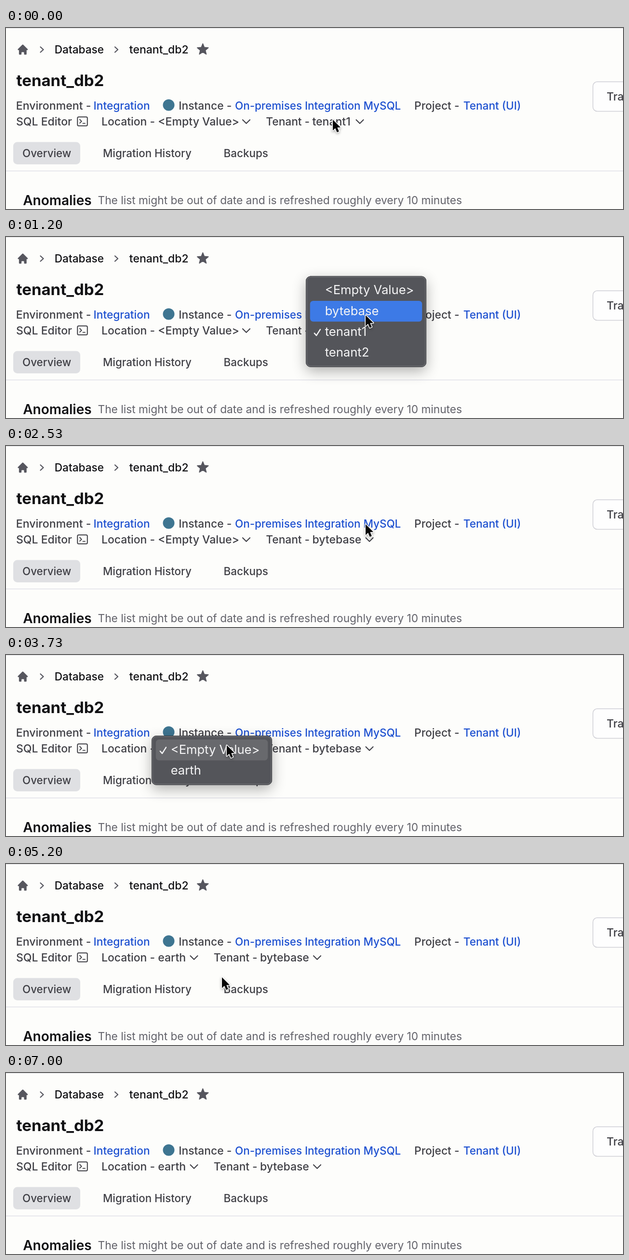
Animation of 1280 by 377 pixels, one loop 7.07 s. Source, as an HTML page with a canvas:

```html
<!DOCTYPE html>
<html lang="en">
<head>
<meta charset="utf-8">
<title>Database labels</title>
<style>
  html, body { margin: 0; width: 100%; height: 100%; overflow: hidden; background: #fdfdfb; }
  canvas { display: block; width: 100vw; height: 100vh; }
</style>
</head>
<body>
<canvas id="stage" width="1280" height="377"></canvas>
<script>
const ctx = document.getElementById('stage').getContext('2d');
const LOOP = 7070;
const FADE = 140;
const ROW = 43.3;
const INK = '#3f3f45', BLACK = '#111114', LINK = '#1d50d0', ICON = '#56565e';

// Pointer stops: time, x, y of the tip.
const stops = [
  [0, 678, 191], [870, 678, 191], [1150, 746, 163], [2650, 746, 163],
  [3350, 458, 188], [4250, 458, 188], [4700, 448, 236], [5200, 448, 236],
  [5700, 1241, 198], [6050, 1241, 198], [6450, 1265, 390], [LOOP, 1265, 390]
];

const menus = [
  { x: 622, y: 81.5, rows: ['<Empty Value>', 'bytebase', 'tenant1', 'tenant2'],
    checked: 2, open: 300, moved: 870, close: 1750 },
  { x: 302, y: 168, rows: ['<Empty Value>', 'earth'],
    checked: 0, open: 3600, moved: 4250, close: 5050 }
];

const ease = p => p * p * (3 - 2 * p);

function pointerAt(t) {
  const i = stops.findIndex((s, n) => n > 0 && t <= s[0]);
  const [t0, x0, y0] = stops[i - 1], [t1, x1, y1] = stops[i];
  const p = ease((t - t0) / (t1 - t0));
  return { x: x0 + (x1 - x0) * p, y: y0 + (y1 - y0) * p };
}

function text(str, x, y, size, color = INK, weight = 500) {
  ctx.font = `${weight} ${size}px Inter, sans-serif`;
  ctx.fillStyle = color;
  ctx.fillText(str, x, y);
}

function box(x, y, w, h, r) {
  ctx.beginPath();
  ctx.roundRect(x, y, w, h, r);
}

function fillBox(x, y, w, h, r, color) {
  box(x, y, w, h, r);
  ctx.fillStyle = color;
  ctx.fill();
}

function line(points, color, width) {
  ctx.beginPath();
  points.forEach(([x, y]) => ctx.lineTo(x, y));
  ctx.strokeStyle = color;
  ctx.lineWidth = width;
  ctx.lineCap = ctx.lineJoin = 'round';
  ctx.stroke();
}

const chevronRight = (x, y) => line([[x - 3, y - 5.5], [x + 3, y], [x - 3, y + 5.5]], ICON, 2.3);
const chevronDown = (x, y) => line([[x - 7.5, y - 3.8], [x, y + 3.8], [x + 7.5, y - 3.8]], INK, 2.1);

function home() {
  const shape = new Path2D('M10.7 2.3a1 1 0 0 0-1.4 0l-7 7a1 1 0 0 0 1.4 1.4L4 10.4V17a1 1 0 0 0 1 1h2a1 1 0 0 0 1-1v-2a1 1 0 0 1 1-1h2a1 1 0 0 1 1 1v2a1 1 0 0 0 1 1h2a1 1 0 0 0 1-1v-6.6l.3.3a1 1 0 0 0 1.4-1.4z');
  ctx.save();
  ctx.translate(21.6, 31.8);
  ctx.scale(1.32, 1.32);
  ctx.fillStyle = ICON;
  ctx.fill(shape);
  ctx.restore();
}

function star(cx, cy) {
  ctx.beginPath();
  for (let i = 0; i < 10; i++) {
    const r = i % 2 ? 5.3 : 12, a = i * Math.PI / 5 - Math.PI / 2;
    ctx.lineTo(cx + r * Math.cos(a), cy + r * Math.sin(a));
  }
  ctx.closePath();
  ctx.fillStyle = ctx.strokeStyle = ICON;
  ctx.lineWidth = 1.8;
  ctx.lineJoin = 'round';
  ctx.fill();
  ctx.stroke();
}

function terminalIcon() {
  box(148.3, 185.3, 20.5, 18.5, 2.5);
  ctx.strokeStyle = INK;
  ctx.lineWidth = 2;
  ctx.stroke();
  line([[153, 190.5], [156.8, 194.3], [153, 198.1]], INK, 1.9);
  line([[159.5, 198.6], [164, 198.6]], INK, 1.9);
}

function header() {
  ctx.fillStyle = '#fdfdfb';
  ctx.fillRect(0, 0, 1280, 377);
  ctx.fillStyle = '#dadadd';
  ctx.fillRect(0, 0, 1280, 1);
  ctx.fillStyle = '#dedee6';
  ctx.fillRect(0, 297, 1280, 1.4);

  home();
  chevronRight(74.5, 45);
  text('Database', 100.8, 53, 22.6, BLACK);
  chevronRight(229, 45);
  text('tenant_db2', 255.8, 53, 23, BLACK);
  star(408.3, 44.8);
  text('tenant_db2', 21.5, 120.5, 33, BLACK, 700);

  box(1217.6, 112, 90, 61.5, 9);
  ctx.fillStyle = '#fefefe';
  ctx.fill();
  ctx.strokeStyle = '#cfcfd6';
  ctx.lineWidth = 1.5;
  ctx.stroke();
  text('Tra', 1246, 151, 23);
}

function details(t) {
  text('Environment -', 20.8, 169.6, 23.1);
  text('Integration', 181.6, 169.6, 22.7, LINK);
  ctx.beginPath();
  ctx.arc(337.5, 160.5, 12, 0, 7);
  ctx.fillStyle = '#3e7591';
  ctx.fill();
  text('Instance -', 358.3, 169.6, 22.8);
  text('On-premises Integration MySQL', 475, 169.6, 22.4, LINK);
  text('Project -', 847, 169.6, 22.8);
  text('Tenant (UI)', 948.7, 169.6, 22.6, LINK);

  const located = t >= menus[1].close + 100;
  const renamed = t >= menus[0].close + 100;
  const shift = located ? -108.5 : 0;
  text('SQL Editor', 21, 202.7, 23);
  terminalIcon();
  text('Location -', 198, 202.7, 22.9);
  text(located ? 'earth' : '<Empty Value>', 315.2, 202.7, 23.1);
  chevronDown(498.5 + shift, 195);
  text('Tenant -', 539.3 + shift, 202.7, 22.7);
  text(renamed ? 'bytebase' : 'tenant1', 635.5 + shift, 202.7, 23);
  chevronDown((renamed ? 754 : 734) + shift, 195);
}

function tabs() {
  fillBox(15, 237.5, 139, 46.5, 8.5, '#dfe0e3');
  text('Overview', 34.1, 269.2, 22.3);
  text('Migration History', 201, 269.2, 22.3);
  text('Backups', 451.6, 269.2, 22.4);
  text('Anomalies', 35.2, 369, 28, BLACK, 600);
  text('The list might be out of date and is refreshed roughly every 10 minutes',
    190.5, 367.2, 22.7, '#62626a', 400);
}

function drawMenu(m, t, pointer) {
  if (t < m.open || t > m.close + FADE) return;
  const h = m.rows.length * ROW + 16.2;
  ctx.save();
  ctx.globalAlpha = Math.min(1, 1 - (t - m.close) / FADE);

  ctx.save();
  ctx.shadowColor = 'rgba(0,0,0,.3)';
  ctx.shadowBlur = 28;
  ctx.shadowOffsetY = 9;
  fillBox(m.x, m.y, 250, h, 10, '#54555a');
  ctx.restore();
  box(m.x + .5, m.y + .5, 249, h - 1, 9.5);
  ctx.strokeStyle = '#303135';
  ctx.lineWidth = 1;
  ctx.stroke();
  box(m.x + 1.7, m.y + 1.7, 246.6, h - 3.4, 8.5);
  ctx.strokeStyle = '#77787c';
  ctx.lineWidth = 1.2;
  ctx.stroke();

  const top = m.y + 8.1;
  const hover = Math.floor((pointer.y - top) / ROW);
  if (hover >= 0 && hover < m.rows.length) {
    fillBox(m.x + 8.8, top + hover * ROW, 232.4, ROW, 6.5, t < m.moved ? '#68696d' : '#3d7ae6');
  }
  m.rows.forEach((label, i) => {
    const base = top + i * ROW + 29.7;
    text(label, m.x + 39.7, base, 25.6, '#f5f5f6', 400);
    if (i === m.checked) {
      line([[m.x + 17.8, base - 5.5], [m.x + 22, base - .7], [m.x + 30, base - 13.5]], '#f5f5f6', 2.4);
    }
  });
  ctx.restore();
}

function drawPointer({ x, y }) {
  ctx.save();
  ctx.translate(x, y);
  ctx.beginPath();
  [[0, 0], [0, 22.5], [5.1, 17.8], [8.7, 26.2], [12.8, 24.4], [9.3, 16.2], [16, 15.9]]
    .forEach(([px, py]) => ctx.lineTo(px, py));
  ctx.closePath();
  ctx.shadowColor = 'rgba(0,0,0,.35)';
  ctx.shadowBlur = 5;
  ctx.shadowOffsetY = 2;
  ctx.strokeStyle = '#fff';
  ctx.lineWidth = 3;
  ctx.lineJoin = 'round';
  ctx.stroke();
  ctx.shadowColor = 'transparent';
  ctx.fillStyle = '#050505';
  ctx.fill();
  ctx.restore();
}

function draw(t) {
  const pointer = pointerAt(t);
  header();
  details(t);
  tabs();
  menus.forEach(m => drawMenu(m, t, pointer));
  drawPointer(pointer);
}

const start = performance.now();
function tick() {
  draw((performance.now() - start) % LOOP);
  requestAnimationFrame(tick);
}
tick();
</script>
</body>
</html>
```
